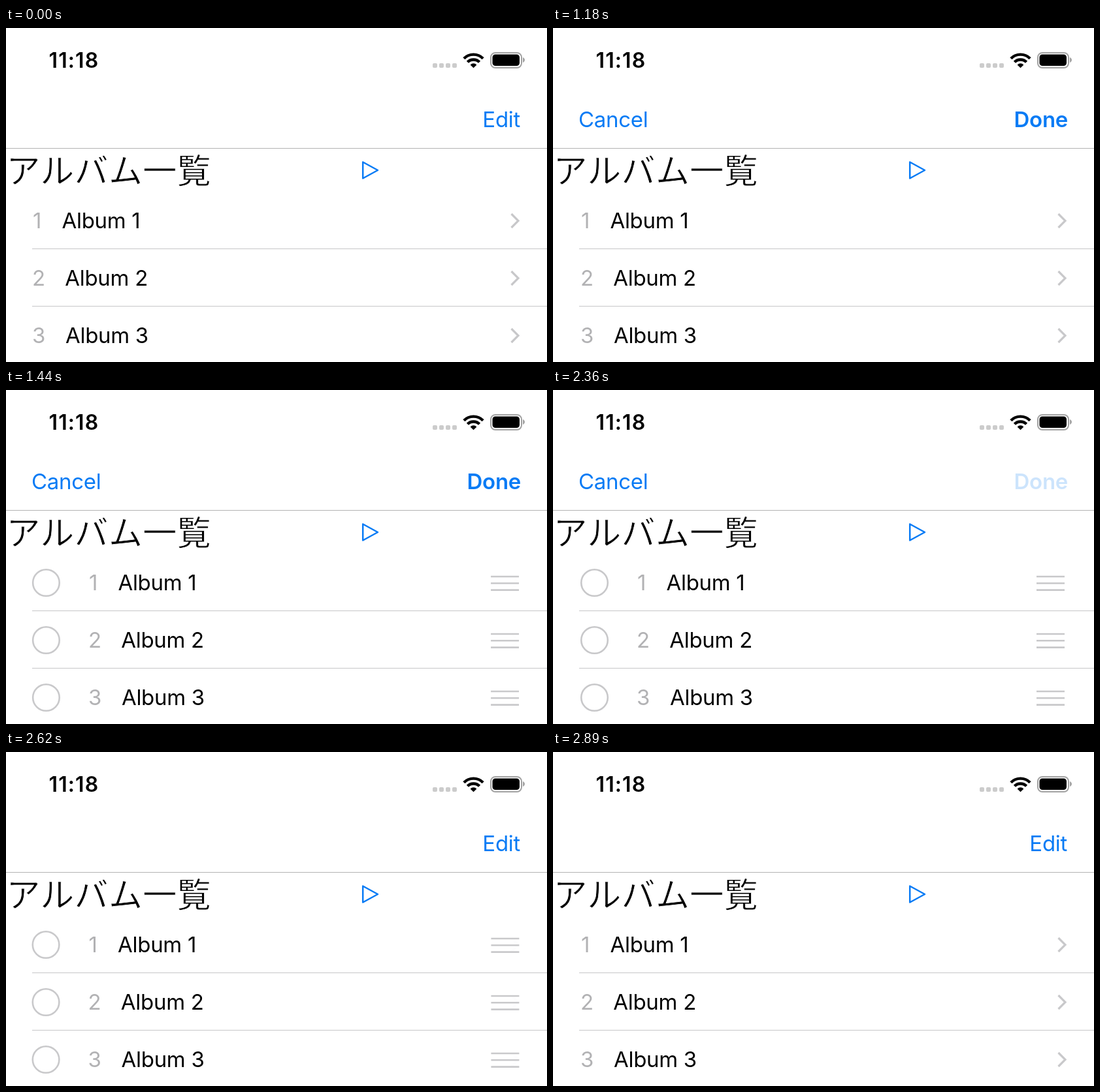
Write an HTML page that moves like this. It is 828 by 512 pixels and loops after 2960 ms.

```html
<!DOCTYPE html>
<html lang="ja">
<head>
<meta charset="utf-8">
<title>Album list</title>
<style>
  html, body { margin: 0; width: 100%; height: 100%; overflow: hidden; background: #fff; }
  svg { display: block; width: 100%; height: 100%; }
  text { font: 400 33px Inter, sans-serif; letter-spacing: -.3px; }
  .time { font-size: 32px; font-weight: 600; letter-spacing: 1.1px; }
  /* The white outline thins the strokes to a lighter weight. */
  .heading { font: 300 52px "Noto Sans CJK JP", "Noto Sans CJK", sans-serif; letter-spacing: .3px; stroke: #fff; stroke-width: .8; }
  .action { fill: #087bf5; }
  .right { text-anchor: end; }
  .bold { font-weight: 600; }
  .number { fill: #b2b2b4; }
  .line { fill: none; stroke: #c8c8ca; stroke-width: 2.6; }
  .chevron { stroke-width: 3.2; }
</style>
</head>
<body>
<svg viewBox="0 0 828 512">
  <text class="time" x="65.5" y="60.8">11:18</text>

  <g fill="#ccc">
    <rect x="653" y="54" width="7" height="7" rx="2"/>
    <rect x="663" y="54" width="7" height="7" rx="2"/>
    <rect x="673" y="54" width="7" height="7" rx="2"/>
    <rect x="683" y="54" width="7" height="7" rx="2"/>
  </g>
  <g fill="none" stroke="#000" stroke-width="4.4">
    <path d="M700.9 46.7a20.6 20.6 0 0 1 29.2 0M706.4 52.2a12.9 12.9 0 0 1 18.2 0"/>
    <path d="M715.5 61.3l-4.9-4.9a6.9 6.9 0 0 1 9.8 0z" fill="#000" stroke="none"/>
  </g>
  <rect x="742" y="38" width="47" height="23" rx="7" fill="none" stroke="#a3a3a3" stroke-width="2"/>
  <rect x="744.5" y="40.5" width="41.5" height="17.5" rx="4.5"/>
  <path d="M791 45c4 1.5 4 6.5 0 8z" fill="#a3a3a3"/>

  <text class="action" id="cancel" x="39" y="151.7">Cancel</text>
  <text class="action right" id="edit" x="787" y="151.7">Edit</text>
  <text class="action right bold" id="done" x="788" y="151.7">Done</text>
  <rect y="184" width="828" height="1" fill="#b3b3b3"/>

  <text class="heading" x=".5" y="237.5">アルバム一覧</text>
  <path d="M546.2 205.5L569 218L546.2 230.5z" fill="none" stroke="#087bf5" stroke-width="2.5" stroke-linejoin="round"/>

  <g id="rows"></g>
  <path d="M40 338.5H828M40 426.5H828" stroke="#c6c6c8"/>
</svg>
<script>
const LOOP = 2960;
const SHIFT = 88;
// Moments at which the screen refreshes; the picture holds in between.
const TICKS = [0, 920, 1050, 1120, 1180, 1250, 1310, 1380, 1440,
               2360, 2490, 2560, 2620, 2690, 2750, 2820, 2890];

const byId = id => document.getElementById(id);
const all = selector => [...document.querySelectorAll(selector)];

const rows = [
  { numberX: 41, labelX: 85.5 },
  { numberX: 40, labelX: 90.3 },
  { numberX: 40, labelX: 91 },
];
byId("rows").innerHTML = rows.map(({ numberX, labelX }, i) => `
  <g transform="translate(0 ${i * 88})">
    <circle class="line select" cx="63.5" cy="295.5" r="20.3"/>
    <g class="label">
      <text class="number" x="${numberX}" y="307">${i + 1}</text>
      <text x="${labelX}" y="307">Album ${i + 1}</text>
    </g>
    <path class="line chevron" d="M773.5 285L784 295.5L773.5 306"/>
    <path class="line handle" d="M740 286h43m-43 10.3h43m-43 10.3h43"/>
  </g>`).join("");

const selects = all(".select"), labels = all(".label");
const chevrons = all(".chevron"), handles = all(".handle");

const progress = (time, start, duration) =>
  Math.min(1, Math.max(0, (time - start) / duration));

// Cubic bezier (.42, 0, .58, 1)
function easeInOut(x) {
  let low = 0, high = 1;
  for (let i = 0; i < 20; i++) {
    const s = (low + high) / 2, r = 1 - s;
    if (1.26 * s * r * r + 1.74 * s * s * r + s * s * s < x) low = s;
    else high = s;
  }
  return x <= 0 ? 0 : x >= 1 ? 1 : low * low * (3 - 2 * low);
}

function place(items, x, opacity) {
  for (const item of items) {
    item.setAttribute("transform", `translate(${x} 0)`);
    item.setAttribute("opacity", opacity);
  }
}

function draw(time) {
  const enter = progress(time, 985, 195), leave = progress(time, 2425, 195);
  const pressed = 0.2;
  const leaving = time >= 2360;
  byId("cancel").setAttribute("opacity", enter - leave);
  byId("edit").setAttribute("opacity",
    time < 920 ? 1 : leaving ? leave : pressed * (1 - enter));
  byId("done").setAttribute("opacity", leaving ? pressed * (1 - leave) : enter);

  const editing = easeInOut(progress(time, 1145, 331)) - easeInOut(progress(time, 2579, 348));
  const hidden = (1 - editing) * SHIFT;
  place(selects, -hidden, editing);
  place(labels, editing * SHIFT, 1);
  place(handles, hidden, editing);
  place(chevrons, 0, 1 - editing);
}

const start = performance.now();
function frame() {
  const time = (performance.now() - start) % LOOP;
  draw(TICKS.findLast(tick => tick <= time));
  requestAnimationFrame(frame);
}
frame();
</script>
</body>
</html>
```
